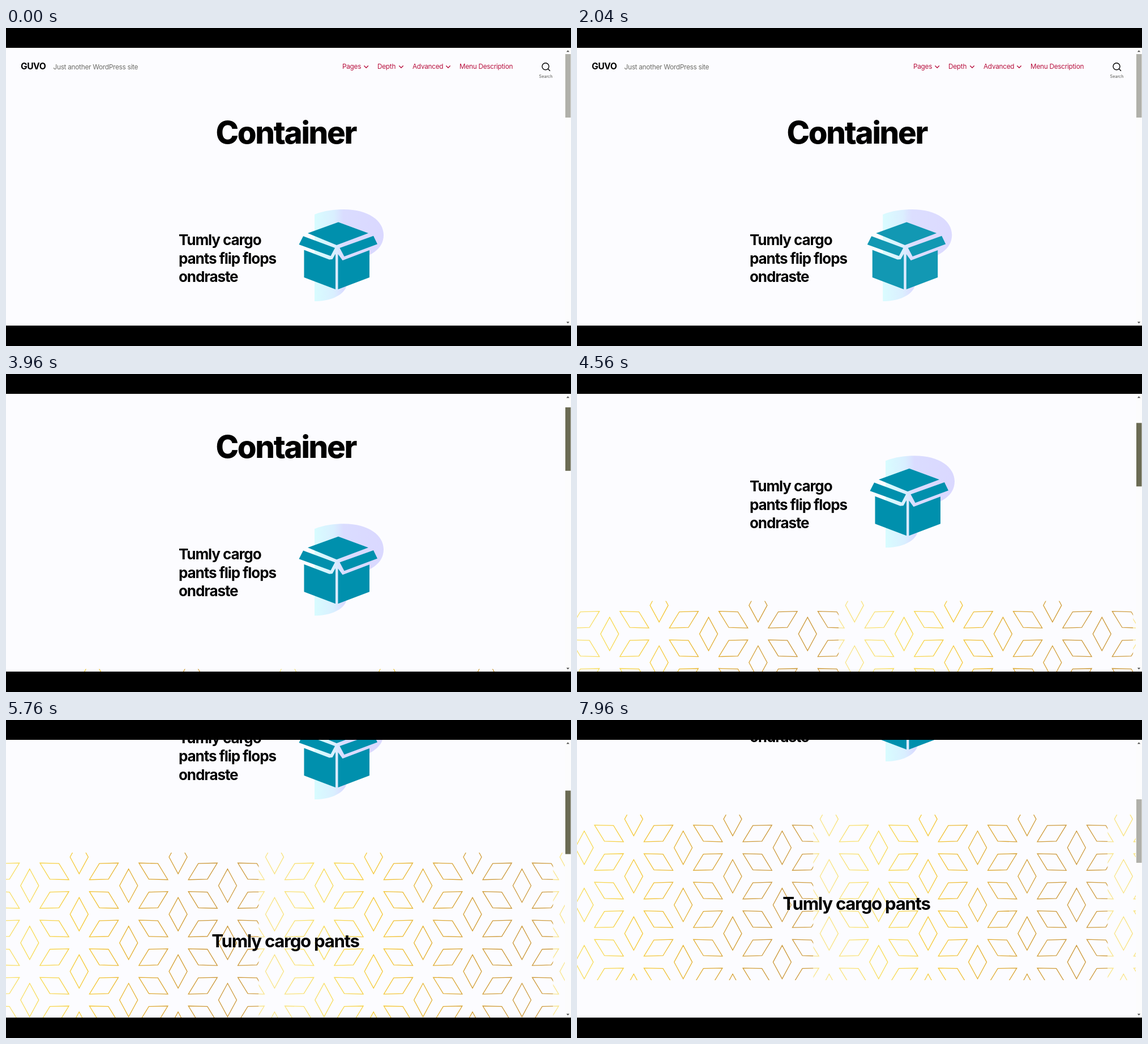
Recreate the animation shown at these times as an HTML page. Size 998 by 561 pixels, loop 8000 ms.

```html
<!DOCTYPE html>
<html lang="en">
<head>
<meta charset="utf-8">
<title>Container</title>
<style>
  html, body { margin: 0; width: 100%; height: 100%; overflow: hidden; background: #000; }
  svg { display: block; width: 100%; height: 100%; }
  text { font-family: Inter, sans-serif; white-space: pre; }
  .heading { font-weight: 700; letter-spacing: -.0416em; }
  .small { font-size: 11.8px; letter-spacing: -.023em; }
  .link { fill: #b8123f; }
  .icon { fill: none; stroke: #000; stroke-width: 1.4; }
</style>
</head>
<body>
<svg viewBox="0 0 998 561">
  <defs>
    <clipPath id="viewport"><rect y="35" width="998" height="490"/></clipPath>
    <clipPath id="section"><rect y="576" width="987" height="292"/></clipPath>
    <clipPath id="tileBox"><rect width="520" height="292"/></clipPath>
    <linearGradient id="gold" gradientUnits="userSpaceOnUse" x1="0" y1="0" x2="515" y2="-50">
      <stop offset="0" stop-color="#f9e58c"/>
      <stop offset=".2" stop-color="#f8dc58"/>
      <stop offset=".4" stop-color="#f5c736"/>
      <stop offset=".6" stop-color="#dda936"/>
      <stop offset=".8" stop-color="#cc993a"/>
      <stop offset="1" stop-color="#cf9e42"/>
    </linearGradient>
    <linearGradient id="blob" gradientUnits="userSpaceOnUse" x1="545" y1="0" x2="667" y2="0">
      <stop offset="0" stop-color="#d8fcff"/>
      <stop offset=".28" stop-color="#d9efff"/>
      <stop offset=".42" stop-color="#dadcff"/>
      <stop offset="1" stop-color="#dad8ff"/>
    </linearGradient>
    <g id="tile" clip-path="url(#tileBox)">
      <path id="petals" fill="none" stroke="url(#gold)" stroke-width="1.3"/>
    </g>
  </defs>

  <g clip-path="url(#viewport)">
    <rect y="35" width="998" height="490" fill="#fcfcff"/>
    <g id="page">
      <text x="26" y="73" font-size="15.6" font-weight="700" letter-spacing="-.5">GUVO</text>
      <text x="83.5" y="73" class="small" fill="#6d6d68">Just another WordPress site</text>
      <g class="small link">
        <text x="594" y="72">Pages</text>
        <text x="656" y="72">Depth</text>
        <text x="718" y="72">Advanced</text>
        <text x="801" y="72">Menu Description</text>
      </g>
      <path d="M632.5 66.5l3.7 3.7 3.7-3.7M694.3 66.5l3.7 3.7 3.7-3.7M777.3 66.5l3.7 3.7 3.7-3.7" class="icon" style="stroke:#b8123f"/>
      <circle cx="953" cy="67.7" r="6" class="icon"/>
      <path d="M957.3 72l3.7 3.7" class="icon"/>
      <text x="953.5" y="87.5" font-size="7.2" text-anchor="middle" fill="#55554f">Search</text>

      <text x="494.3" y="203.5" font-size="54.6" text-anchor="middle" class="heading" style="font-weight:800">Container</text>
      <g font-size="26" class="heading">
        <text x="305" y="383">Tumly cargo</text>
        <text x="305" y="415.5">pants flip flops</text>
        <text x="305" y="448">ondraste</text>
      </g>

      <g id="box">
        <path fill="url(#blob)" d="M545 329C562 322 580 320 597 320C640 320 667 340 667 365C667 392 642 402 612 414C604 428 606 444 600 459C592 474 570 482 545 482Z"/>
        <g fill="#0090ad">
          <path d="M533 362L587 342.5L640 362L584 383Z"/>
          <path d="M525 367.3L581 388L573.5 402.3L517.5 382Z"/>
          <path d="M649 366.8L656 381.3L597.5 403L589.5 388Z"/>
          <path d="M526.5 391.5L571 408.5L576.5 408L582 398.5V461L526.5 440Z"/>
          <path d="M586.5 399L594.5 410L642 392V440L586.5 461Z"/>
        </g>
      </g>

      <g clip-path="url(#section)">
        <g id="pattern">
          <use href="#tile" x="-520"/>
          <use href="#tile"/>
          <use href="#tile" x="520"/>
          <use href="#tile" x="1040"/>
        </g>
      </g>
      <g id="zoom">
        <text y="11" font-size="31.2" text-anchor="middle" class="heading">Tumly cargo pants</text>
      </g>
    </g>

    <rect x="987" y="35" width="11" height="490" fill="#fcfcfd"/>
    <path d="M989.8 42.3h5.4l-2.7-3zM989.8 518.2h5.4l-2.7 3z" fill="#505050"/>
    <rect id="thumb" x="988" y="46" width="9.5" height="112"/>
  </g>
</svg>
<script>
const LOOP = 8000;
const el = id => document.getElementById(id);
const clamp = v => Math.min(1, Math.max(0, v));
const place = (id, x, y, scale = 1) =>
  el(id).setAttribute('transform', `translate(${x} ${y}) scale(${scale})`);

// The CSS "ease" curve, cubic-bezier(.25, .1, .25, 1).
function ease(x) {
  const bezier = (s, a, b) => 3 * s * (1 - s) ** 2 * a + 3 * s * s * (1 - s) * b + s ** 3;
  let low = 0, high = 1;
  for (let i = 0; i < 20; i++) {
    const mid = (low + high) / 2;
    if (bezier(mid, 0.25, 0.25) < x) low = mid; else high = mid;
  }
  return bezier(high, 0.1, 1);
}

// Rhombus with half axes 16 x 29.5, turned by an angle in degrees.
function rhombus(cx, cy, degrees) {
  const a = degrees * Math.PI / 180, c = Math.cos(a), s = Math.sin(a);
  const points = [[0, -29.5], [16, 0], [0, 29.5], [-16, 0]].map(([x, y]) =>
    `${(cx + x * c - y * s).toFixed(2)} ${(cy + x * s + y * c).toFixed(2)}`);
  return `M${points.join('L')}Z`;
}

// Petals sit on the edges of a triangular lattice of star centres.
function petals() {
  const dx = 87.4, dy = 50.45;
  let d = '';
  for (let col = -1; col <= 6; col++) {
    for (let row = -1; row <= 3; row++) {
      const x = 28 + col * dx;
      const y = 58.3 + row * 2 * dy - (col & 1) * dy;
      d += rhombus(x, y + dy, 0);
      d += rhombus(x + dx / 2, y - dy / 2, 60);
      d += rhombus(x + dx / 2, y + dy / 2, -60);
    }
  }
  return d;
}

// Time in ms and page scroll in px.
const scrollKeys = [
  [3320, 0], [3640, 18], [3960, 55.5], [5120, 287.5], [5760, 342],
  [5880, 350], [6000, 354], [6280, 380], [6680, 409]
];

function scrollAt(t) {
  if (t <= scrollKeys[0][0]) return 0;
  const next = scrollKeys.findIndex(key => key[0] > t);
  if (next < 0) return scrollKeys.at(-1)[1];
  const [t0, y0] = scrollKeys[next - 1], [t1, y1] = scrollKeys[next];
  return y0 + (y1 - y0) * (t - t0) / (t1 - t0);
}

function draw(t) {
  const scroll = scrollAt(t);
  place('page', 0, -scroll);
  place('thumb', 0, scroll * 0.2296);
  el('thumb').setAttribute('fill', t >= 3040 && t < 7240 ? '#6b6b54' : '#b0b0aa');

  const shown = t < 200 ? 1 : ease(clamp((t - 700) / 2000));
  place('box', -65 * (1 - shown), 0);
  el('box').setAttribute('opacity', shown);

  const seam = 429 + (7080 - t) * 0.0132;
  place('pattern', seam % 520, 576);

  const zoom = ease(clamp((t - 5010) / 700));
  place('zoom', 493.5, 732.5, 0.6 + 0.4 * zoom);
  el('zoom').setAttribute('opacity', zoom);
}

el('petals').setAttribute('d', petals());

function tick() {
  draw(performance.now() % LOOP);
  requestAnimationFrame(tick);
}
tick();
</script>
</body>
</html>
```
